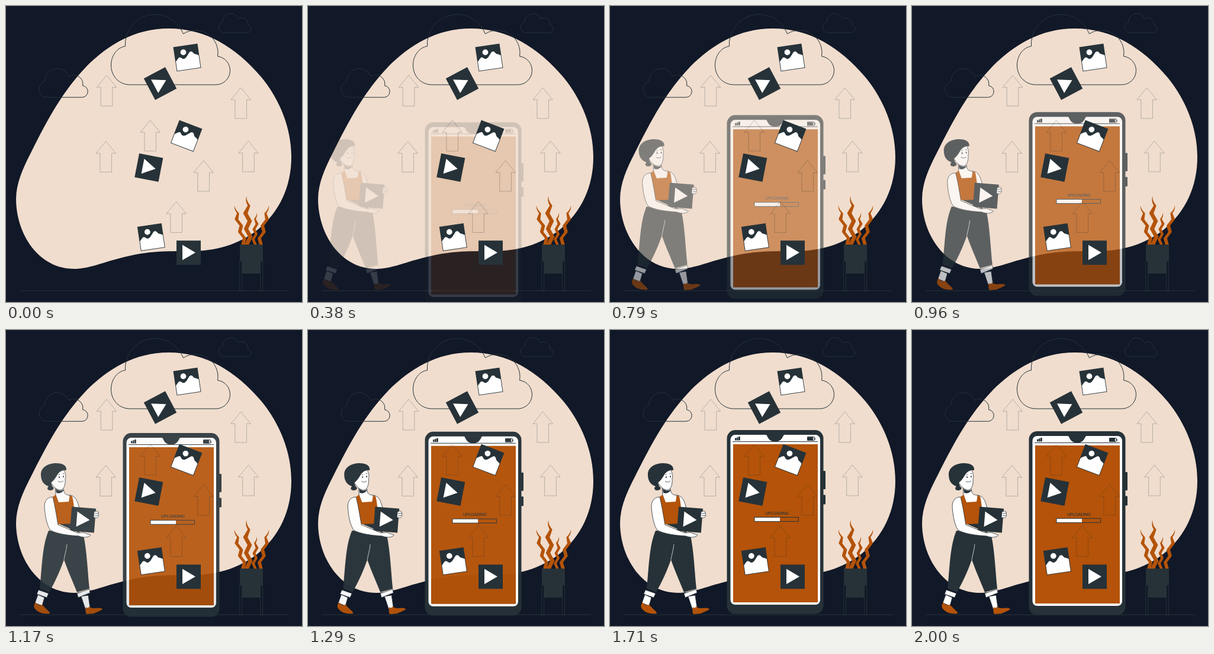
An HTML page that plays this animation: 500 px wide and 500 px high, repeating every 2040 ms.

```html
<!DOCTYPE html>
<html lang="en">
<head>
<meta charset="utf-8">
<title>Uploading</title>
<style>
  html, body { margin: 0; height: 100%; overflow: hidden; background: #111827; }
  svg { display: block; width: 100vw; height: 100vh; }
  .dark { fill: #263238; }
  .accent { fill: #b45309; }
  .white { fill: #fff; }
  .line { fill: none; stroke: #263238; vector-effect: non-scaling-stroke; }
  .skin { fill: #fff; stroke: #263238; stroke-width: .8; stroke-linejoin: round; }
  #arrows { fill: none; stroke: #263238; stroke-opacity: .27; }
  #label { font: 11px Roboto, "Open Sans", "Noto Sans", sans-serif; font-stretch: 75%; letter-spacing: -.06em; }
</style>
</head>
<body>
<svg viewBox="0 0 500 500">
  <defs>
    <path id="cloud" class="line" d="M32 118H177A24.1 24.1 0 0 0 180 70A38 38 0 0 0 122 32L119 26A50.500 50.500 0 0 0 24 53C10 55 0 69 0 85C0 104 14 118 32 118Z"/>
    <path id="arrow" d="M0 0L16.7 20.3H9.8V52H-9.8V20.3H-16.7Z"/>
    <g id="video">
      <path class="dark" d="M-20.5-20.5h41v41h-41z"/>
      <path class="white" d="M-10.5-13.2L11.5-.3L-10.5 12.6Z"/>
    </g>
    <g id="photo">
      <path class="dark" d="M-20.7-20.7h41.4v41.4h-41.4z"/>
      <circle class="white" cx="-5.1" cy="-9.7" r="4.9"/>
      <path class="white" d="M-19.8 4C-17 2-15-2-12.5-2C-10-2-9 1.500-6 1.500C-2 1.500 1-4 4-7C6-10 9-10 11-7C13-3 16-4 19.8-1V19.8H-19.8Z"/>
    </g>
  </defs>

  <path fill="#f0ddce" d="M17 326C17 300 28 275 42 248C72 188 96 144 136 102C172 66 217 38 275 38C337 38 388 69 432 121C462 158 482 205 482 255C482 305 462 348 425 378C390 405 350 415 305 414C260 414 235 415 196 425C160 434 140 444 115 444C55 444 17 385 17 326Z"/>
  <path class="line" d="M23 481H478"/>
  <use href="#cloud" x="177.500" y="15"/>
  <use href="#cloud" transform="translate(56 106) scale(.409)"/>
  <use href="#cloud" transform="translate(359.500 13) scale(.272)"/>

  <path id="plant" class="accent"/>
  <path class="line" d="M394.7 431h4v50h-4zM429.7 431h4v50h-4z"/>
  <path class="dark" d="M395 403H434V431H430V452H399V431H395Z"/>

  <g id="phone">
    <rect class="dark" x="355" y="238" width="9" height="31" rx="1"/>
    <rect class="dark" x="355" y="278.500" width="9" height="16" rx="1"/>
    <rect class="dark" x="197.500" y="169" width="163" height="310.500" rx="14"/>
    <rect class="white" x="203.500" y="177" width="151.500" height="287" rx="8"/>
    <path class="dark" d="M263 176.500C267 178 266 188.500 279 188.500C292 188.500 291 178 295 176.500Z"/>
    <path class="line" d="M207 188.500H351"/>
    <path class="dark" d="M211 186.500v-4h2.500v4zM214 186.500v-5.200h2.500v5.200zM217 186.500v-6.500h2.800v6.500zM345.500 182h1.300v3.500h-1.300z"/>
    <rect class="line" x="333.500" y="180.500" width="11.500" height="6"/>
    <path class="dark" d="M334 181h9v5h-9z"/>
    <path class="accent" d="M208 193H351V460H208Z"/>
    <text id="label" class="dark" x="281.700" y="311.700" text-anchor="middle">UPLOADING</text>
    <path class="white" d="M244 316.300h43v7h-43z"/>
    <rect class="line" x="244" y="316.300" width="74.500" height="7"/>
  </g>

  <g id="person">
    <!-- legs -->
    <path class="skin" d="M59 447L70 452L66 466L54 461ZM132 450L144 448L147 469L139 471Z"/>
    <path class="accent" d="M55 460C52 464 51 468 55 472C60 477 66 480 79 479C79 475 74 473 70 468L66 464C62 466 58 464 55 460Z"/>
    <path class="accent" d="M140 468C139 473 139 477 141 480L153 479C157 477 163 475 168 472C168 469 160 469 154 470C150 470 147 469 146 467C144 470 142 470 140 468Z"/>
    <path class="dark" d="M77 339C66 365 66 400 62 437L78 443C88 425 96 408 103 388C110 408 118 425 125 443L146 437C143 410 142 375 136 347C115 348 95 345 80 339Z"/>
    <path fill="none" stroke="#fff" stroke-width=".7" d="M108 362C107 372 104 381 103 388"/>
    <path class="skin" d="M60 439L77 445L74 452L57 446ZM125 445L146 438L147 444L127 452Z"/>
    <!-- body -->
    <path class="skin" d="M113 279C122 280 126 288 129 302L117 306ZM88 262L89 279L94 293L113 292L113 279C106 279 103 277 102 268Z"/>
    <path class="dark" d="M91 326L118 324L130 343Z"/>
    <path class="accent" d="M84 282L89 278L94 291L111 290L113 279L117 281C120 292 121 310 121 327L92 328C88 312 86 300 84 282Z"/>
    <path class="dark" d="M89 268C94 272 99 272 103 269C101 275 95 277 90 275Z"/>
    <!-- head -->
    <path class="skin" d="M80 256C85 265 91 271 98 270C104 269 106 258 105 251C107 248 105 242 103 236C95 233 84 246 80 256Z"/>
    <path class="dark" d="M64 244C64 232 76 225 90 225C101 225 108 229 107 237C100 236 94 240 91 246C88 251 85 255 81 258C82 261 83 264 84 265C88 267 84 271 80 271C76 271 73 268 77 264C68 261 64 254 64 244Z"/>
    <ellipse class="dark" cx="95" cy="248.500" rx=".9" ry="1.500"/>
    <ellipse class="dark" cx="102" cy="247.500" rx=".9" ry="1.500"/>
    <path class="line" stroke-width=".8" d="M93 255.500C96 257.500 99 257 102 255M93.500 245L96 243.500M100.500 242.500L103 243"/>
    <!-- box and arm -->
    <use href="#video" transform="translate(135 320.500) rotate(4.500)"/>
    <path class="skin" d="M154 307C158 305 162 306 161 309C162 312 162 315 159 317C157 318 154 317 153 316ZM155 310L161 309.500M155 314L161 313"/>
    <path class="skin" d="M84 282C74 282 70 290 70 298C71 314 74 330 80 338C90 344 110 347 128 348C136 351 144 351 148 346.500C146 344.500 141 345 138 342.500C134 341 128 344 124 342L93 329C90 312 88 298 84 282Z"/>
  </g>

  <g id="arrows">
    <use href="#arrow" x="170" y="117"/>
    <use href="#arrow" x="168.700" y="228.500"/>
    <use href="#arrow" x="396.700" y="138"/>
    <use href="#arrow" x="409.500" y="228"/>
    <use href="#arrow" x="243.700" y="193"/>
    <use href="#arrow" x="333.700" y="261"/>
    <use href="#arrow" x="287.700" y="330.500"/>
  </g>
  <use href="#photo" transform="translate(306 87) rotate(-8.500)"/>
  <use href="#photo" transform="translate(304.700 219.500) rotate(21)"/>
  <use href="#photo" transform="translate(245.300 390.500) rotate(-8.500)"/>
  <use href="#video" transform="translate(260.500 131) rotate(-28)"/>
  <use href="#video" transform="translate(241.300 273) rotate(11)"/>
  <use href="#video" transform="translate(308.500 416.700)"/>
</svg>
<script>
const $ = id => document.getElementById(id);
const LOOP = 2040, STEP = 1000 / 24, STEPS = 49, SHIFT = 30;

// A zigzag leaf that widens from its tip down to the pot
function leaf(tipX, tipY, baseX, side) {
  const left = [], right = [], height = 403 - tipY;
  for (let y = 0; y <= height; y++) {
    const u = y / height;
    const wave = Math.asin(Math.sin(u * 19.5 - 2.2)) * 2 / Math.PI;
    const x = tipX + (baseX - tipX) * u + side * wave * height / 24 * Math.min(1, u * 5);
    const half = height / 22 * Math.min(1, u * 3);
    left.push([x - half, tipY + y]);
    right.unshift([x + half, tipY + y]);
  }
  return 'M' + left.concat(right).join('L') + 'Z';
}
$('plant').setAttribute('d', leaf(386, 337, 403, 1) + leaf(406.5, 321, 410, 1) +
  leaf(423.5, 349, 419, -1) + leaf(444, 337, 428, -1));

const label = $('label');
label.style.fontSize = 11 * Math.min(1, 39.5 / label.getComputedTextLength()) + 'px';

const bezier = (a, b, s) => 3 * (1 - s) ** 2 * s * a + 3 * (1 - s) * s * s * b + s ** 3;

// cubic-bezier(.36, -.01, .5, 1.38)
function ease(x) {
  let lo = 0, hi = 1;
  for (let i = 0; i < 24; i++) {
    const mid = (lo + hi) / 2;
    if (bezier(.36, .5, mid) < x) lo = mid; else hi = mid;
  }
  return bezier(-.01, 1.38, hi);
}

function place(el, x, y, opacity) {
  el.setAttribute('transform', `translate(${x} ${y})`);
  el.setAttribute('opacity', opacity);
}

const start = performance.now();
function draw() {
  const t = (performance.now() - start) % LOOP;
  const step = Math.min(STEPS, Math.floor((t + 5) / STEP) + 1);
  const p = ease(step / STEPS);
  const opacity = step < 5 ? 0 : Math.min(1, p);
  const shift = SHIFT * (1 - p) + 2;
  place($('phone'), 0, shift, opacity);
  place($('person'), -shift, 0, opacity);
  requestAnimationFrame(draw);
}
draw();
</script>
</body>
</html>
```
